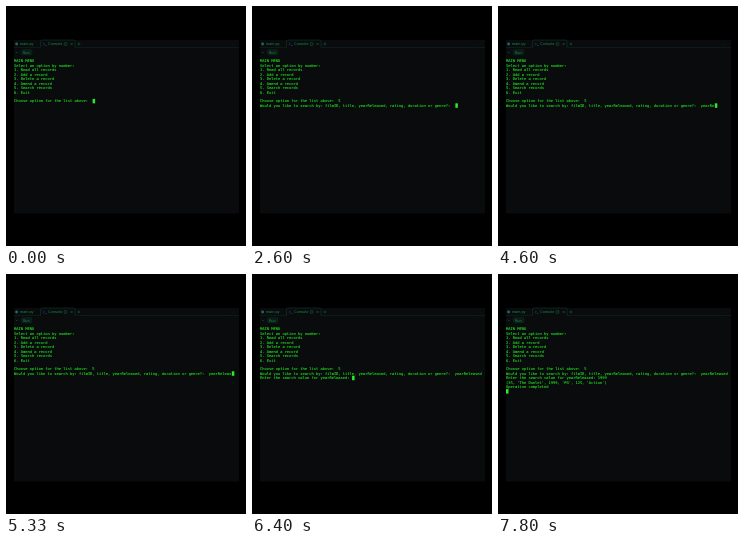
These frames come from a looping animation (240x240 px, 8 s). An HTML page:

```html
<!DOCTYPE html>
<html lang="en">
<head>
<meta charset="utf-8">
<title>Console record search</title>
<style>
  html, body { margin: 0; width: 100%; height: 100%; overflow: hidden; background: #000; }
  svg { display: block; width: 100vw; height: 100vh; }
  text { white-space: pre; text-rendering: geometricPrecision; }
  #lines text { font: 3.73px "DejaVu Sans Mono", monospace; fill: #22e822; stroke: #22e822; stroke-width: .08px; }
  .ui { font: 3.7px Inter, "Open Sans", sans-serif; fill: #1c8a4a; }
  .line { fill: none; stroke: #124034; stroke-width: .5; }
  .icon { fill: none; stroke: #1c7a4a; stroke-width: .45; }
</style>
</head>
<body>
<svg viewBox="0 0 240 240">
  <rect width="240" height="240" fill="#000"/>
  <rect x="8" y="34" width="225" height="173.5" fill="#090b0d"/>
  <path class="line" d="M8 41.5H34.5M69 41.5H233" opacity=".6"/>
  <path class="line" d="M34.5 41.5V35.5Q34.5 34 36 34H67.5Q69 34 69 35.5V41.5" stroke="#17314c"/>
  <circle cx="10.6" cy="38" r="1.4" fill="#1d6a66"/>
  <text class="ui" x="14" y="39.3">main.py</text>
  <path class="icon" d="M37 36.6l1.4 1.4-1.4 1.4M39 39.5h1.5" style="stroke:#2b67a8"/>
  <text class="ui" x="42" y="39.3">Console</text>
  <rect class="icon" x="58.3" y="36.7" width="2.6" height="2.6" rx=".4"/>
  <path class="icon" d="M64.6 37l2 2m0-2l-2 2M71.4 38h3m-1.5-1.5v3"/>
  <g fill="#164a2c"><circle cx="225.4" cy="38" r=".35"/><circle cx="226.8" cy="38" r=".35"/><circle cx="228.2" cy="38" r=".35"/></g>
  <path class="icon" d="M9.6 45.7l1.2 1.2 1.2-1.2"/>
  <rect x="15.2" y="43.6" width="11" height="5.4" rx="1.4" fill="#0b1d19" stroke="#123028" stroke-width=".3"/>
  <text class="ui" x="17" y="47.6">Run</text>
  <g id="lines"></g>
  <rect id="cursor" width="2.5" height="4.5" fill="#2bea2b"/>
</svg>
<script>
const LOOP = 8000, LEFT = 8, TOP = 56.4, CELL = 2.2455, ROW = 4.45;

const MENU = `MAIN MENU
Select an option by number:
1. Read all records
2. Add a record
3. Delete a record
4. Amend a record
5. Search records
6. Exit

Choose option for the list above:  `;

// [time in ms, text added to the console]
const STEPS = [
  [0, MENU],
  [1070, '5'],
  [2130, '\n'],
  [2200, 'Would you like to search by: filmID, title, yearReleased, rating, duration or genre?:  '],
  ...keys('yearReleased', [3330, 3530, 3800, 4000, 4330, 4530, 4870, 5070, 5200, 5330, 5470, 5530]),
  [5930, '\nEnter the search value for yearReleased: '],
  ...keys('1999', [7070, 7200, 7330, 7470]),
  [7670, '\n'],
  [7730, "(35, 'The Dunlet', 1999, 'PG', 125, 'Action')\nOperation completed\n"]
];

function keys(word, times) {
  return times.map((time, i) => [time, word[i]]);
}

const group = document.getElementById('lines');
const cursor = document.getElementById('cursor');
const rows = Array.from({ length: 15 }, (_, i) => {
  const row = document.createElementNS('http://www.w3.org/2000/svg', 'text');
  row.setAttribute('x', LEFT);
  row.setAttribute('y', TOP + i * ROW);
  return group.appendChild(row);
});

let shown = null;

function draw(time) {
  const output = STEPS.filter(step => step[0] <= time).map(step => step[1]).join('');
  if (output === shown) return;
  shown = output;
  const lines = output.split('\n');
  rows.forEach((row, i) => { row.textContent = lines[i] || ''; });
  const last = lines.length - 1;
  cursor.setAttribute('x', LEFT + lines[last].length * CELL);
  cursor.setAttribute('y', TOP + last * ROW - 3.6);
}

const start = performance.now();

function tick() {
  draw((performance.now() - start) % LOOP);
  requestAnimationFrame(tick);
}

tick();
</script>
</body>
</html>
```
